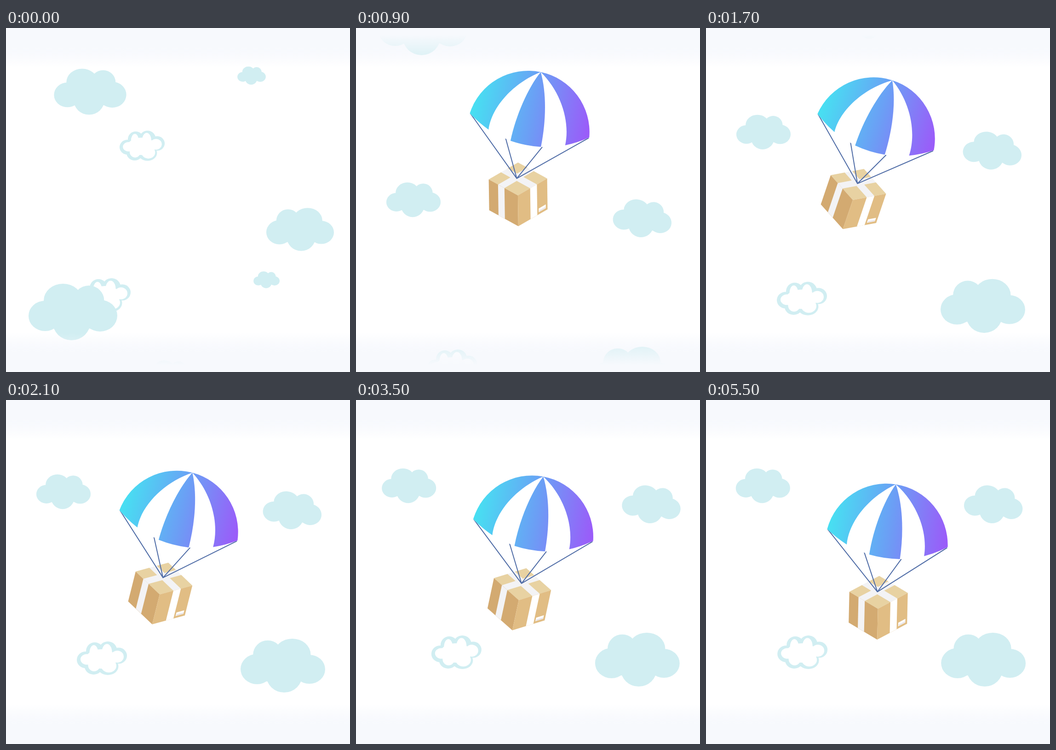
An HTML page for the animation above (5600 ms loop, 748 px wide and 748 px high).

```html
<!DOCTYPE html>
<html lang="en">
<head>
<meta charset="utf-8">
<title>Parcel by parachute</title>
<style>
  html, body { margin: 0; width: 100%; height: 100%; overflow: hidden; background: #fff; }
  svg { display: block; width: 100vw; height: 100vh; }
</style>
</head>
<body>
<svg viewBox="0 0 748 748">
  <defs>
    <linearGradient id="canopy" gradientUnits="userSpaceOnUse" x1="266" y1="0" x2="518" y2="0">
      <stop offset="0" stop-color="#48def2"/>
      <stop offset=".5" stop-color="#6b9ff5"/>
      <stop offset="1" stop-color="#9a5cf9"/>
    </linearGradient>
    <linearGradient id="sky" x2="0" y2="1">
      <stop offset=".055" stop-color="#f7f9fd"/>
      <stop offset=".115" stop-color="#fff"/>
      <stop offset=".885" stop-color="#fff"/>
      <stop offset=".945" stop-color="#f7f9fd"/>
    </linearGradient>
    <linearGradient id="haze" x2="0" y2="1">
      <stop offset=".02" stop-color="#f7f9fd"/>
      <stop offset=".113" stop-color="#f7f9fd" stop-opacity="0"/>
      <stop offset=".887" stop-color="#f7f9fd" stop-opacity="0"/>
      <stop offset=".98" stop-color="#f7f9fd"/>
    </linearGradient>

    <g id="solid" fill="#d1eef2">
      <ellipse cx="-21.5" cy="-25" rx="42" ry="36.5"/>
      <ellipse cx="34.5" cy="-24.5" rx="33.5" ry="33"/>
      <ellipse cx="-60.5" cy="8.5" rx="36" ry="33"/>
      <ellipse cx="59" cy="8" rx="37.5" ry="34.5"/>
      <ellipse cx="-3" cy="22" rx="41" ry="39.5"/>
      <rect x="-62" y="-24" width="122" height="60"/>
    </g>

    <g id="hollow">
      <g fill="#d1eef2">
        <ellipse cx="-35.5" cy="3.5" rx="19" ry="18"/>
        <ellipse cx="-15.5" cy="-15.5" rx="19" ry="19"/>
        <ellipse cx="13" cy="-16.5" rx="20" ry="20"/>
        <ellipse cx="36.5" cy="-5.5" rx="18" ry="17.5"/>
        <ellipse cx="13" cy="17.5" rx="23" ry="19"/>
        <ellipse cx="-18" cy="16.5" rx="20" ry="19"/>
      </g>
      <g fill="#fff">
        <ellipse cx="-32.5" cy="2.5" rx="14" ry="11.5"/>
        <ellipse cx="-17.5" cy="-11.5" rx="9.5" ry="17"/>
        <ellipse cx="11" cy="-13" rx="11" ry="18"/>
        <ellipse cx="33.5" cy="-3.5" rx="14" ry="13"/>
        <ellipse cx="15" cy="16.5" rx="16.5" ry="14.5"/>
        <ellipse cx="-17" cy="15" rx="13" ry="13.5"/>
        <ellipse cx="-1.5" cy="1.5" rx="34" ry="21"/>
      </g>
    </g>
  </defs>

  <rect width="748" height="748" fill="url(#sky)"/>
  <g id="clouds"></g>

  <g id="chute">
    <g id="parcel"></g>
    <path d="M260 389 387 508 346 427M387 508 428 430M387 508 523 391"
          fill="none" stroke="#4f6ca6" stroke-width="2" stroke-linejoin="round"/>
    <path d="M259 389A133.3 133.3 0 0 1 524 389.5A223.5 223.5 0 0 1 259 389Z" fill="#fff"/>
    <g fill="url(#canopy)">
      <path d="M259 389A133.3 133.3 0 0 1 392.5 271C340 305 303 365 306 416Q281 405 259 389Z"/>
      <path d="M392.5 271C372 310 358 375 357.5 430.5Q391 435 425 430.5C425 375 415 315 392.5 271Z"/>
      <path d="M392.5 271A133.3 133.3 0 0 1 524 389.5Q501 406 476 416.5C477 365 445 305 392.5 271Z"/>
    </g>
  </g>

  <rect width="748" height="748" fill="url(#haze)"/>
</svg>

<script>
const LOOP = 5600, STEP = 100;
const SVG = "http://www.w3.org/2000/svg";
const byId = id => document.getElementById(id);

function add(parent, tag, attrs) {
  const node = document.createElementNS(SVG, tag);
  for (const key in attrs) node.setAttribute(key, attrs[key]);
  return parent.appendChild(node);
}

// Smooth curve through [time, value] points without overshoot.
function curve(points) {
  const secant = i => (points[i + 1][1] - points[i][1]) / (points[i + 1][0] - points[i][0]);
  const last = points.length - 1;
  const slopes = points.map((_, i) => {
    if (i === 0) return secant(0);
    if (i === last) return secant(last - 1);
    const a = secant(i - 1), b = secant(i);
    return a * b > 0 ? 2 * a * b / (a + b) : 0;
  });
  return t => {
    if (t >= points[last][0]) return points[last][1];
    const i = points.findIndex(p => p[0] > t) - 1;
    const [t0, v0] = points[i], [t1, v1] = points[i + 1];
    const h = t1 - t0, s = (t - t0) / h, r = 1 - s;
    return v0 * r * r * (1 + 2 * s) + v1 * s * s * (3 - 2 * s)
      + h * s * r * (slopes[i] * r - slopes[i + 1] * s);
  };
}

const scroll = curve([[0, 807], [250, 668], [500, 460], [600, 366], [700, 293], [900, 187],
  [1300, 91], [1800, 31], [2100, 13], [2400, 3], [2620, 0]]);
const chuteX = curve([[0, 395], [500, 391.5], [1300, 359.6], [2100, 371.3], [3500, 382.6],
  [4500, 388.6], [5500, 392.3]]);
const chuteY = curve([[0, 900], [250, 640], [500, 404.5], [800, 250], [1100, 201.5], [2740, 331],
  [4040, 277.8], [5230, 320], [5500, 315.3], [5600, 311]]);
const chuteTilt = curve([[0, -6], [500, 0], [1300, 19.5], [2100, 14.3], [3500, 10.2],
  [4500, 9.1], [5500, 8.4]]);
const parcelTilt = curve([[0, -42], [500, -32], [1300, 21.6], [2100, 12.8], [3500, 10.8],
  [4500, 6.8], [5500, 0]]);
const drift = t => Math.max(0, 16.7 - 0.0112 * Math.abs(t - 4115));

// y is the resting height once the scroll has ended.
const clouds = [
  { x: 183, y: -668.5, size: .815 },
  { x: 534, y: -703.5, size: .32 },
  { shape: "hollow", x: 296, y: -551, size: .9 },
  { x: 639.5, y: -369, size: .762, flip: -1 },
  { x: 566.5, y: -259.5, size: .295 },
  { shape: "hollow", x: 216.5, y: -226.5, size: 1 },
  { x: 145.5, y: -189.5, size: 1 },
  { x: 356, y: -50.5, size: .549 },
  { x: 125, y: 186.5, size: .612, sway: -1 },
  { x: 622.8, y: 227.5, size: .662, sway: 2, tilt: 5 },
  { shape: "hollow", x: 208.5, y: 548.5, size: 1, sway: 1 },
  { x: 602, y: 564.5, size: .953, flip: -1, sway: 1 }
];
for (const c of clouds) c.node = add(byId("clouds"), "use", { href: "#" + (c.shape || "solid") });

// The parcel hangs from the origin; u and v run along its front edges, h runs down.
function drawParcel(parcel) {
  const at = (u, v, h) => [-61 + 62 * u + 65 * v - 1.5 * h, 37 * u - 34.5 * v + 67 * h];
  const face = (fill, ...corners) => add(parcel, "polygon", {
    points: corners.map(c => at(...c)).join(" "), fill
  });
  const top = (fill, u0, u1, v0, v1) =>
    face(fill, [u0, v0, 0], [u1, v0, 0], [u1, v1, 0], [u0, v1, 0]);
  const left = (fill, u0, u1) =>
    face(fill, [u0, 0, 0], [u1, 0, 0], [u1, 0, 1], [u0, 0, 1]);
  const right = (fill, v0, v1, h0 = 0, h1 = 1) =>
    face(fill, [1, v0, h0], [1, v1, h0], [1, v1, h1], [1, v0, h1]);
  const U = [.32, .54], V = [.42, .65];

  top("#f3f3f5", 0, 1, 0, 1);
  for (const [u0, u1] of [[0, U[0]], [U[1], 1]])
    for (const [v0, v1] of [[0, V[0]], [V[1], 1]]) top("#e8d2a2", u0, u1, v0, v1);
  left("#d3aa71", 0, 1);
  left("#f3f3f5", ...U);
  right("#e1bd84", 0, 1);
  right("#fff", ...V);
  right("#fff", .7, .94, .81, .93);
  right("#e6e3e9", .72, .93, .88, .92);
}
drawParcel(byId("parcel"));

function draw(t) {
  const lift = scroll(t), shift = drift(t);
  for (const { node, x, y, size, flip = 1, sway = 0, tilt = 0 } of clouds)
    node.setAttribute("transform",
      `translate(${x + sway * shift} ${y + lift}) rotate(${tilt}) scale(${size * flip} ${size})`);

  const tilt = chuteTilt(t);
  byId("chute").setAttribute("transform",
    `translate(${chuteX(t)} ${chuteY(t)}) rotate(${tilt}) translate(-391.5 -404.5)`);
  byId("parcel").setAttribute("transform",
    `translate(387 508) rotate(${parcelTilt(t) - tilt})`);
}

const start = performance.now();
function tick() {
  const elapsed = performance.now() - start + 8;
  draw(Math.floor(elapsed / STEP) * STEP % LOOP);
  requestAnimationFrame(tick);
}
tick();
</script>
</body>
</html>
```
